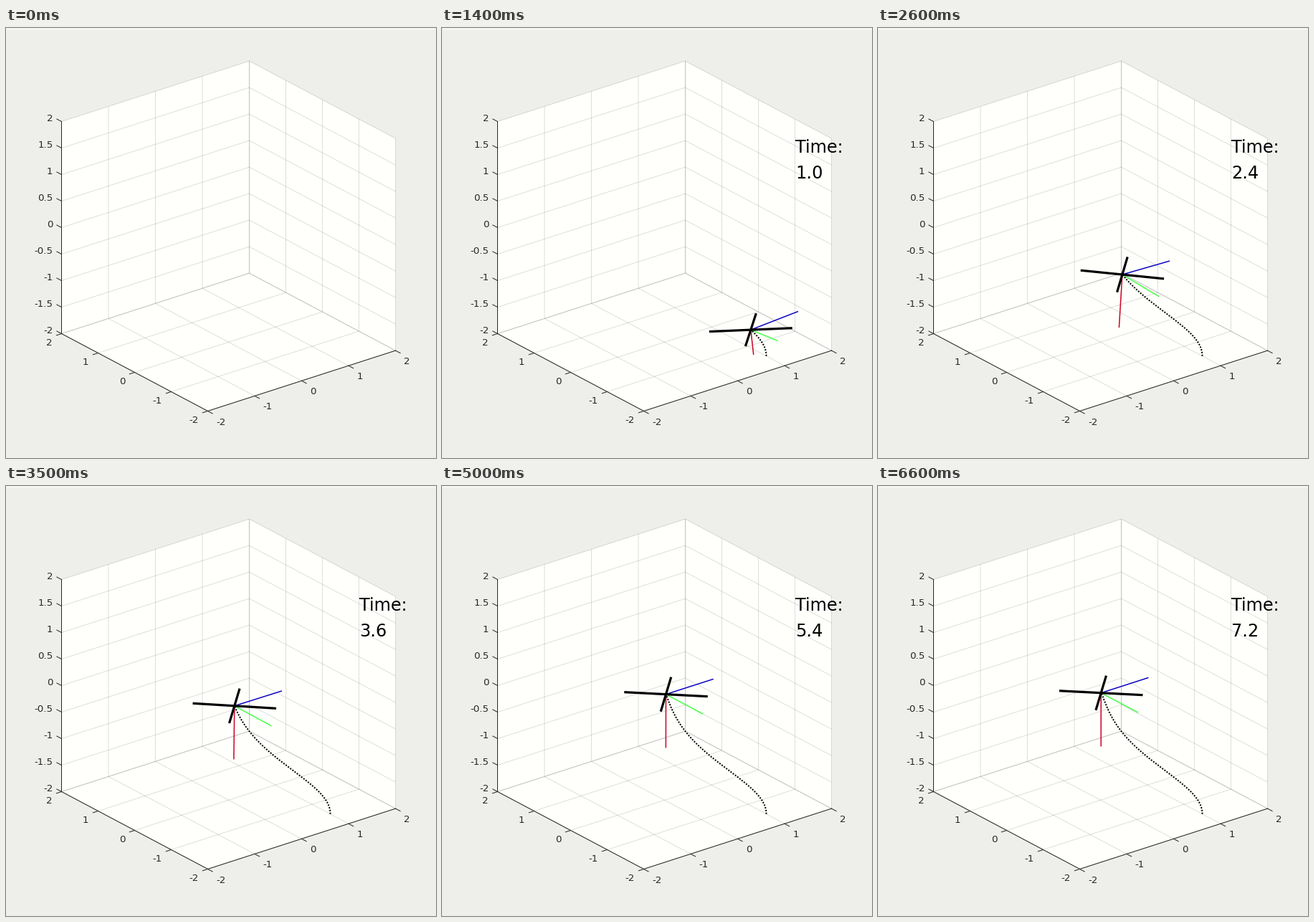
Recreate the animation shown at these times as a matplotlib script. Size 600 by 600 pixels, loop 6.7 s.

```python
import numpy as np
import matplotlib.pyplot as plt
from matplotlib.animation import FuncAnimation

PX = 0.72  # points per pixel at 100 dpi
INK = "#262626"
FRAMES, INTERVAL = 67, 100
FIRST = 5     # empty box before take-off
STEP = 0.15   # simulated seconds per redraw
GRAVITY = 10.5

# Orthographic view: pixel centre of the box and one unit along x, y, z
CENTRE = np.array([310.5, 290.3])
BASIS = np.array([[65.5, -21.1], [-51, -27], [0, -74]])


def project(p):
    return CENTRE + np.asarray(p, float) @ BASIS


def side(t):
    """Share of the horizontal offset still to fly."""
    return 1 / (1 + (np.maximum(t, 0) / 1.68) ** 3.65)


def drop(t):
    """Share of the vertical offset still to climb, with a slight overshoot."""
    return 1.012 * np.exp(-(t / 2.308) ** 1.74) - 0.012


def position(t):
    s = side(t)
    return np.stack([s, -1.5 * s, -2 * drop(t)], axis=-1)


def attitude(t, h=0.3):
    """Body axes; the craft leans the way it accelerates."""
    k = -(side(t - h) - 2 * side(t) + side(t + h)) / h ** 2 / GRAVITY
    ex = np.array([1, 0, k]) / np.hypot(1, k)
    ez = np.array([-k, 1.5 * k, 1])
    ez /= np.linalg.norm(ez)
    return ex, np.cross(ez, ex), ez


def clip(p, d):
    """End of the ray p + d, cut at the box walls."""
    r = 1.0
    for a, b in zip(p, d):
        if abs(a + b) > 2 and abs(b) > 1e-9:
            r = min(r, max(0, (np.sign(b) * 2 - a) / b))
    return p + r * d


def sim_time(i):
    return STEP * max(0, round((0.119 * i - 0.624) / STEP))


fig = plt.figure(figsize=(6, 6), dpi=100, facecolor="#eeefeb")
ax = fig.add_axes([0, 0, 1, 1])
ax.set_xlim(0, 600)
ax.set_ylim(600, 0)
ax.axis("off")
ax.plot([0, 600], [.5, .5], color="#fcfcfa", lw=PX)


def line(pts, color=INK, width=1, **kw):
    x, y = project(pts).T
    return ax.plot(x, y, color=color, lw=width * PX, snap=False, **kw)[0]


def label(x, y, s, size, **kw):
    return ax.text(x, y, s, fontsize=size * PX, family="DejaVu Sans",
                   va="baseline", **kw)


def ticks(axis, corner, toward, dx, dy, ha, step=1):
    """Tick marks and numbers along one edge of the box."""
    mark = np.asarray(toward, float) @ BASIS
    mark *= 7.5 / np.hypot(*mark)
    for v in np.arange(-2, 2.1, step):
        p = np.array(corner, float)
        p[axis] = v
        x, y = project(p)
        ax.plot([x, x + mark[0]], [y, y + mark[1]], color=INK, lw=PX)
        label(x + dx, y + dy, f"{v:g}", 13.33, color=INK, ha=ha)


def draw_box():
    walls = ([(-2, 2, -2), (2, 2, -2), (2, 2, 2), (-2, 2, 2)],
             [(2, 2, -2), (2, -2, -2), (2, -2, 2), (2, 2, 2)],
             [(-2, -2, -2), (2, -2, -2), (2, 2, -2), (-2, 2, -2)])
    for wall in walls:
        ax.fill(*project(wall).T, color="#fffffc", lw=0)
    grid = dict(alpha=.15, solid_capstyle="butt")
    for v in range(-2, 3):
        line([(v, -2, -2), (v, 2, -2)], **grid)
        line([(v, 2, -2), (v, 2, 2)], **grid)
        line([(-2, v, -2), (2, v, -2)], **grid)
        line([(2, v, -2), (2, v, 2)], **grid)
    for v in np.arange(-2, 2.1, .5):
        line([(-2, 2, v), (2, 2, v)], **grid)
        line([(2, 2, v), (2, -2, v)], **grid)
    line([(-2, 2, 2), (-2, 2, -2), (-2, -2, -2), (2, -2, -2)])


draw_box()
ticks(0, (0, -2, -2), (0, -1, 0), 11.5, 19, "left")
ticks(1, (-2, 0, -2), (-1, 0, 0), -13, 16.7, "right")
ticks(2, (-2, 2, 0), (0, 1, 0), -12, -.4, "right", .5)

nil = [(0, 0, 0)] * 2
rays = [line(nil, c, 1.5) for c in ("#0a00c0", "#cc0022", "#44ff44")]
trail = line(nil, "black", 2, linestyle=(0, (1, .95)), dash_capstyle="butt")
arms = [line(nil, "black", 3.2, solid_capstyle="butt") for _ in range(2)]
title = label(493, 173.5, "Time:", 24, color="black")
clock = label(493, 210, "", 24, color="black")
moving = [*rays, trail, *arms, title, clock]


def place(artist, pts):
    artist.set_data(*project(pts).T)


def update(i):
    for artist in moving:
        artist.set_visible(i >= FIRST)
    t = sim_time(i)
    p = position(t)
    ex, ey, ez = attitude(t)
    for ray, d in zip(rays, (ex, -ez, -ey)):
        place(ray, [p, clip(p, d)])
    for arm, d in zip(arms, (ex - ey, ex + ey)):
        place(arm, [p - d / 2, p + d / 2])
    place(trail, position(np.linspace(0, t, 150)))
    clock.set_text(f"{abs(t - 1e-6):.1f}")
    return moving


anim = FuncAnimation(fig, update, frames=FRAMES, interval=INTERVAL,
                     repeat=True, repeat_delay=0)
plt.show()
```
